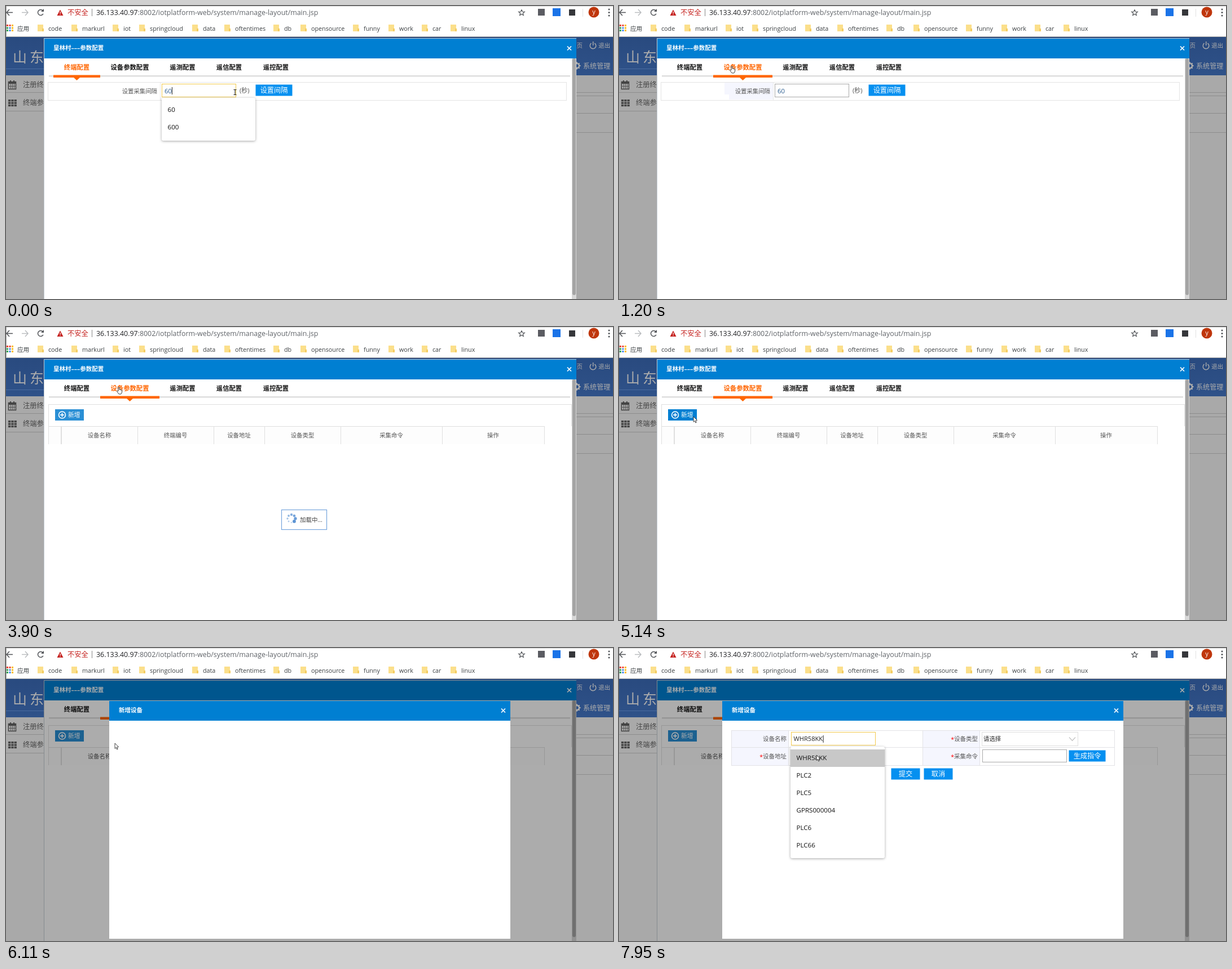
An HTML page with a canvas that plays this animation: 1076x520 px, repeating every 8 s.

```html
<!DOCTYPE html>
<html lang="zh">
<head>
<meta charset="utf-8">
<style>
  html, body { margin: 0; width: 100%; height: 100%; overflow: hidden; background: #fff; }
  canvas { display: block; }
</style>
</head>
<body>
<canvas id="stage" width="1076" height="520"></canvas>
<script>
const LOOP = 8000;
const ctx = document.getElementById('stage').getContext('2d');
const FONT = '"Open Sans", "Noto Sans CJK SC", "Noto Sans CJK", "Noto Sans", sans-serif';
const BLUE = '#007fd2', BUTTON = '#0590f0', ORANGE = '#ff6600', LABEL_BG = '#f5f6fe';
const LINE = '#dfdfdf', FOCUS = '#f2c94c', SHADED_TEXT = '#acacac';

// Pointer poses: time, x, y, shape; each one holds until the next.
const POINTER = [
  [0, 406, 153, 'beam'], [150, 430, 157, 'arrow'], [280, 462, 156, 'hand'],
  [430, 330, 150, 'beam'], [550, 232, 140, 'arrow'], [690, 208, 127, 'arrow'],
  [810, 199, 115, 'arrow'], [960, 201, 112, 'hand'], [4200, 190, 122, 'arrow'],
  [4325, 166, 140, 'arrow'], [4450, 145, 153, 'arrow'], [4760, 135, 157, 'arrow'],
  [4900, 132, 159, 'arrow'], [5720, 140, 160, 'arrow'], [5840, 148, 161, 'arrow'],
  [5990, 171, 165, 'arrow'], [6110, 193, 169, 'arrow'], [6260, 198, 170, 'arrow'],
  [6660, 259, 169, 'arrow'], [6810, 312, 160, 'beam'], [6930, 339, 157, 'beam'],
  [7440, 345, 179, 'arrow'], [7560, 348, 185, 'arrow'], [7710, 350, 190, 'arrow']
];

function rect(x, y, w, h, color) {
  ctx.fillStyle = color;
  ctx.fillRect(x, y, w, h);
}

function frame(x, y, w, h, color, width = 1) {
  ctx.strokeStyle = color;
  ctx.lineWidth = width;
  ctx.strokeRect(x + .5, y + .5, w - 1, h - 1);
}

function path(points, stroke, width = 1, fill) {
  ctx.beginPath();
  for (let i = 0; i < points.length; i += 2) ctx.lineTo(points[i], points[i + 1]);
  if (fill) { ctx.closePath(); ctx.fillStyle = fill; ctx.fill(); }
  if (stroke) { ctx.strokeStyle = stroke; ctx.lineWidth = width; ctx.stroke(); }
}

function arc(x, y, r, color, width, from = 0, to = 7) {
  ctx.beginPath();
  ctx.arc(x, y, r, from, to);
  ctx.lineWidth = width || 1;
  ctx.fillStyle = ctx.strokeStyle = color;
  width ? ctx.stroke() : ctx.fill();
}

function rounded(x, y, w, h, r, color) {
  ctx.beginPath();
  ctx.roundRect(x, y, w, h, r);
  ctx.fillStyle = color;
  ctx.fill();
}

// y is the vertical middle of the glyphs.
function text(str, x, y, size, color, align = 'left', weight = 400) {
  ctx.font = `${weight} ${size}px ${FONT}`;
  ctx.textAlign = align;
  ctx.fillStyle = color;
  ctx.fillText(str, x, y + size * .36);
  return ctx.measureText(str).width;
}

function button(label, x, y, w, color = BUTTON) {
  rect(x + .5, y + .5, w - 1, 20, color);
  text(label, x + w / 2, y + 10.5, 12.2, '#fff', 'center');
}

function titleBar(label, x, y, w) {
  rect(x, y, w, 35, BLUE);
  text(label, x + 17, y + 16, 10.5, '#fff', 'left', 700);
  const cx = x + w - 12.5, cy = y + 17;
  path([cx - 3.5, cy - 3.5, cx + 3.5, cy + 3.5], '#fff', 1.7);
  path([cx + 3.5, cy - 3.5, cx - 3.5, cy + 3.5], '#fff', 1.7);
}

function browserBar() {
  rect(0, 0, 1076, 54, '#fff');
  rect(0, 0, 1076, 1, '#d4d4d4');
  rect(0, 0, 1, 54, '#aaa');
  path([12, 11.5, 1, 11.5], '#505357', 1.5);
  path([6, 6, 1, 11.5, 6, 17], '#505357', 1.5);
  path([28, 11.5, 39, 11.5], '#b8babd', 1.4);
  path([34, 6, 39, 11.5, 34, 17], '#b8babd', 1.4);
  arc(61.5, 11.5, 5, '#505357', 1.5, .5, 5.5);
  path([67, 5, 67, 10, 62, 10], null, 1, '#505357');
  path([96, 6.5, 101.5, 17, 90.5, 17], null, 1, '#c5221f');
  rect(95.5, 10, 1.2, 3.5, '#fff');
  rect(95.5, 14.5, 1.2, 1.2, '#fff');
  text('不安全', 109, 12, 12.3, '#c5221f');
  rect(152, 5, 1, 13, '#888');
  const host = text('36.133.40.97', 160, 12, 12.4, '#202124');
  text(':8002/iotplatform-web/system/manage-layout/main.jsp', 160 + host, 12, 12.4, '#5f6368');

  const star = [];
  for (let i = 0; i <= 10; i++) {
    const a = i * Math.PI / 5 - Math.PI / 2, r = i % 2 ? 2.5 : 5.6;
    star.push(914 + r * Math.cos(a), 12 + r * Math.sin(a));
  }
  path(star, '#505357', 1.2);
  rect(943, 5, 12, 12, '#5b5c62');
  rect(969, 4, 14, 14, '#1a73e8');
  rect(998, 6, 11, 11, '#35363a');
  rect(1022, 5, 1, 14, '#e0e0e0');
  arc(1042, 11, 9.5, '#bf360c');
  text('y', 1042, 10, 11, '#fff', 'center');
  for (const y of [6, 11.5, 17]) arc(1069, y, 1.5, '#505357');

  const dots = ['#ea4335', '#ea4335', '#fbbc05', '#34a853', '#4285f4', '#fbbc05', '#34a853', '#4285f4', '#fbbc05'];
  dots.forEach((c, i) => rect(1 + i % 3 * 4.5, 33 + Math.floor(i / 3) * 4.5, 3, 3, c));
  text('应用', 20, 40, 10.6, '#3c4043');
  const marks = {
    code: 75, markurl: 135, iot: 208, springcloud: 255, data: 349, oftentimes: 406,
    db: 493, opensource: 541, funny: 634, work: 697, car: 756, linux: 807
  };
  for (const name in marks) {
    const x = marks[name];
    rect(x - 19, 33, 10, 12, '#fbdf8b');
    rect(x - 11, 40, 3, 5, '#f3cc63');
    text(name, x, 40, 10.75, '#3c4043');
  }
}

function backPage() {
  rect(0, 54, 1076, 466, '#a9a9a9');
  const blue = ctx.createLinearGradient(0, 55, 0, 123);
  blue.addColorStop(0, '#294a7f');
  blue.addColorStop(1, '#2f5289');
  rect(0, 55, 1076, 68, blue);
  rect(0, 111, 67, 1, '#4a6c9f');
  text('山', 12, 91, 25, SHADED_TEXT);
  text('东', 42, 91, 25, SHADED_TEXT);
  for (const y of [153, 186]) rect(0, y, 67, 1, '#8c8c8c');
  for (const y of [153, 159, 190, 224]) rect(1011, y, 65, 1, '#8c8c8c');

  frame(4, 134, 14, 14, '#444', 1.5);
  rect(4, 134, 14, 4, '#444');
  rect(7, 132, 2, 4, '#444');
  rect(13, 132, 2, 4, '#444');
  for (const x of [8, 11, 14]) rect(x, 138, 1, 10, '#555');
  rect(4, 142, 14, 1, '#555');
  for (let i = 0; i < 9; i++) rect(4 + i % 3 * 5.3, 166 + Math.floor(i / 3) * 4.4, 4.3, 3.4, '#444');
  text('注册终端', 30, 140, 12.3, '#454545');
  text('终端参数', 30, 172, 12.3, '#454545');

  text('首页', 1022, 70, 10.6, SHADED_TEXT, 'right');
  arc(1040.5, 70.5, 5.3, SHADED_TEXT, 1.4, -1, 4.1);
  rect(1040, 63, 1.4, 7, SHADED_TEXT);
  text('退出', 1050, 70.5, 10.6, SHADED_TEXT);
  arc(1012, 106, 4, SHADED_TEXT, 2.5);
  for (let i = 0; i < 8; i++) {
    const a = i * Math.PI / 4;
    arc(1012 + 5.5 * Math.cos(a), 106 + 5.5 * Math.sin(a), 1.2, SHADED_TEXT);
  }
  text('系统管理', 1023, 107, 12.1, SHADED_TEXT);
}

function tabs(active) {
  const names = ['终端配置', '设备参数配置', '遥测配置', '遥信配置', '遥控配置'];
  const edges = [84, 167, 272, 354, 437, 520];
  rect(76, 123, 924, 2.5, '#dedede');
  names.forEach((name, i) => {
    const mid = (edges[i] + edges[i + 1]) / 2, on = i === active;
    text(name, mid, 108.5, 11.35, on ? ORANGE : '#111', 'center', 700);
    if (!on) return;
    rect(edges[i], 122.5, edges[i + 1] - edges[i], 4.5, ORANGE);
    path([mid - 6, 126.5, mid + 6, 126.5, mid, 132], null, 1, ORANGE);
  });
}

function suggestions(x, y, w, h, items, firstY, picked) {
  ctx.save();
  ctx.shadowColor = 'rgba(0,0,0,.35)';
  ctx.shadowBlur = 4;
  ctx.shadowOffsetY = 1;
  rounded(x, y, w, h, 3, '#fff');
  ctx.restore();
  if (picked) rect(x, firstY - 15, w, 31, '#c8c8c8');
  items.forEach((item, i) => text(item, x + 10.5, firstY + i * 31, 11.6, '#111'));
}

function intervalPanel(t) {
  frame(74, 135, 920, 33, '#e4e4e4');
  if (t >= 430) {
    const left = t < 690 ? 225 : 187, lower = Math.max(left, 195);
    rect(left, 136, 273 - left, 21, LABEL_BG);
    rect(lower, 157, 273 - lower, 9, LABEL_BG);
  }
  rect(273, 136, 1, 31, '#e8e8e8');
  text('设置采集间隔', 268, 151, 10.4, '#555', 'right');
  frame(276, 138, 132, 24, t < 960 ? FOCUS : '#a9a9a9');
  const width = text('60', 281, 150.5, 11.3, '#2a5c8e');
  if (t < 150 || t >= 690 && t < 960) rect(281 + width, 144, 1, 13, '#222');
  text('(秒)', 414, 150.5, 11, '#555');
  button('设置间隔', 442, 139, 66, t >= 280 && t < 430 ? BLUE : BUTTON);
  if (t < 1200) {
    ctx.globalAlpha = t < 960 ? 1 : t < 1080 ? .6 : .25;
    suggestions(276, 163, 166, 76, ['60', '600'], 183.5);
    ctx.globalAlpha = 1;
  }
}

function devicePanel(t) {
  rect(76, 177, 878, 31, '#fdfdfd');
  rect(75, 137, 928, 1, LINE);
  rect(75, 137, 1, 71, LINE);
  rect(1002, 137, 1, 39, LINE);
  rect(75, 176, 880, 1, LINE);
  rect(87, 146, 51, 20, t >= 4760 && t < 5290 ? BLUE : '#2a8fd5');
  arc(99.5, 156, 6, '#fff', 1.6);
  rect(96, 155.2, 7, 1.7, '#fff');
  rect(98.7, 152.5, 1.7, 7, '#fff');
  text('新增', 110, 156, 10.8, '#fff', 'left', 500);
  const edges = [98, 233, 368, 458, 593, 773, 954];
  for (const x of [97, ...edges]) rect(x, 176, 1, 32, LINE);
  ['设备名称', '终端编号', '设备地址', '设备类型', '采集命令', '操作'].forEach((name, i) =>
    text(name, (edges[i] + edges[i + 1]) / 2, 192.5, 10.4, '#555', 'center'));
}

function loading(t) {
  rect(488, 324, 81, 36, '#fff');
  frame(488, 324, 81, 36, '#76a5dc', 1.2);
  const turn = Math.floor((t - 3900) / 137 + .2);
  for (let i = 0; i < 8; i++) {
    const a = (turn - i + 1) * Math.PI / 4, near = 1 - i / 8;
    ctx.globalAlpha = .3 + .7 * near;
    arc(506 + 7 * Math.cos(a), 340 + 7 * Math.sin(a), 1 + 1.9 * near, '#5b93d3');
  }
  ctx.globalAlpha = 1;
  text('加载中...', 521, 342, 10.5, '#444');
}

function mainDialog(t) {
  rect(67, 58, 944, 462, '#fff');
  rect(67, 57, 944, 1, '#b9cde0');
  titleBar('皇林村–––参数配置', 67, 58, 944);
  rect(67, 58, 1, 462, '#c5cdd4');
  rect(1003, 93, 8, 427, '#d8d8d8');
  rounded(1004, 93, 6, 420, 3, '#a5a5a5');
  tabs(t < 960 ? 0 : 1);
  if (t < 2570) intervalPanel(t);
  else if (t >= 2720) devicePanel(t);
  if (t >= 2840 && t < 4900) loading(t);
}

function fieldLabel(str, x, y, required) {
  const width = text(str, x, y, 10.5, '#555', 'right');
  if (required) text('*', x - width, y + 1, 10.5, '#f00', 'right');
}

function deviceForm(t) {
  for (const x of [199, 538]) rect(x, 146, 102, 62, LABEL_BG);
  frame(199, 146, 680, 63, '#e2e2e6');
  rect(199, 176, 680, 1, '#e2e2e6');
  for (const x of [300, 538, 639]) rect(x, 146, 1, 62, '#e2e2e6');
  fieldLabel('设备名称', 297, 161.5, false);
  fieldLabel('设备地址', 297, 192.5, true);
  fieldLabel('设备类型', 636, 161.5, true);
  fieldLabel('采集命令', 636, 192.5, true);

  const focused = t >= 7050;
  frame(305, 149, 150, 24, focused ? FOCUS : t >= 6930 ? '#555' : '#a9a9a9');
  frame(305, 180, 150, 24, '#a9a9a9');
  frame(643, 149, 171, 25, '#dedede');
  path([798, 158.5, 803.5, 164.5, 809, 158.5], '#c4c4c4', 1.3);
  frame(644, 180, 150, 23, '#a9a9a9');
  if (t >= 7440) text('请选择', 646, 161.5, 10.4, '#222');
  button('生成指令', 797, 181, 66);
  button('提交', 482, 213, 52);
  button('取消', 540, 213, 52);

  const picked = t >= 7710;
  const width = picked ? text('WHR58KK', 309.5, 161.5, 11.1, '#222') : 0;
  if (focused && (t < 7440 || picked)) rect(310 + width, 155, 1, 13, '#222');
  if (t >= 7170) {
    suggestions(304, 175, 167, 198, ['WHR58KK', 'PLC2', 'PLC5', 'GPRS000004', 'PLC6', 'PLC66'], 195, picked);
  }
}

function addDialog(t) {
  rect(67, 57, 944, 463, 'rgba(0,0,0,.325)');
  rect(183, 94, 711, 422, '#fff');
  titleBar('新增设备', 183, 94, 711);
  if (t >= 6260) deviceForm(t);
}

function pointer(t) {
  const [, x, y, shape] = POINTER.findLast(pose => t >= pose[0]);
  ctx.save();
  ctx.translate(x, y);
  if (shape === 'beam') {
    path([0, -4.5, 0, 4.5], '#222', 1.1);
    for (const end of [-4.5, 4.5]) path([-2.5, end, 2.5, end], '#222', 1);
  } else if (shape === 'hand') {
    path([-2, 2, -2, -5, 0, -5, 0, -1, 4.5, 0, 4.5, 4, 3, 7, -1, 7, -4.5, 2, -3.5, 1, -2, 2], '#444', 1, '#fff');
  } else {
    path([0, 0, 0, 9.5, 2.2, 7.5, 3.7, 11, 5.2, 10.3, 3.8, 7, 6.6, 6.6, 0, 0], '#333', .9, '#fff');
  }
  ctx.restore();
}

function draw(now) {
  const t = now % LOOP;
  backPage();
  mainDialog(t);
  if (t >= 5290) addDialog(t);
  browserBar();
  pointer(t);
  requestAnimationFrame(draw);
}
requestAnimationFrame(draw);
</script>
</body>
</html>
```
